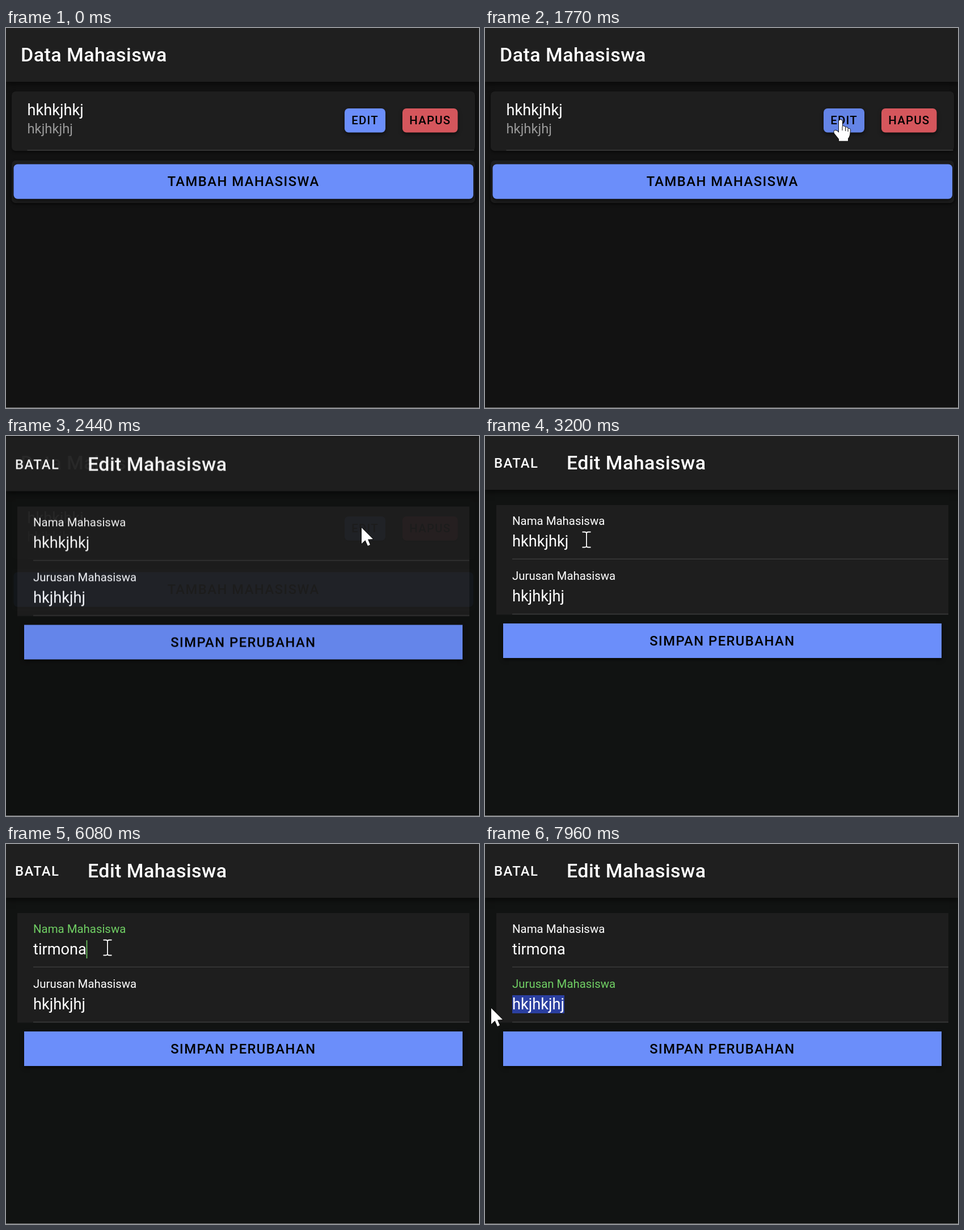
Animation, 834 px wide and 671 px high, one loop 8 s. Source, as an HTML page with a canvas:

```html
<!DOCTYPE html>
<html lang="id">
<head>
<meta charset="utf-8">
<title>Data Mahasiswa</title>
<style>
html, body { margin: 0; width: 100%; height: 100%; overflow: hidden; background: #121212; }
canvas { display: block; }
</style>
</head>
<body>
<canvas id="stage" width="834" height="671"></canvas>
<script>
const W = 834, H = 671, LOOP = 8000;
const BLUE = [107, 142, 250], GREEN = [112, 207, 100], WHITE = [255, 255, 255];
const HOVER = [100, 132, 230], RED = [213, 86, 92];
const NAME = 'tirmona', OLD_NAME = 'hkhkjhkj', MAJOR = 'hkjhkjhj';
const KEY_TIMES = [5350, 5415, 5480, 5620, 5715, 5810, 6080];
const CARET_ON = [[3450, 3950], [4010, 5010], [5350, 6580], [7080, 7350]];
const CLICKS = [[2030, 2200], [3450, 3680], [7350, 7955]];
const MODAL_START = 2303, MODAL_TIME = 280;

const NAME_COLORS = [[0, WHITE], [3450, GREEN], [4680, BLUE], [5350, GREEN], [7350, WHITE]];
const MAJOR_COLORS = [[0, WHITE], [7350, GREEN]];

// time, x, y of the pointer
const PATH = [
  [660, 450, 655], [1000, 505, 390], [1140, 535, 305], [1240, 570, 237],
  [1420, 580, 167], [1490, 602, 168], [1770, 627, 162], [2510, 627, 162],
  [2650, 430, 178], [2780, 235, 182], [2920, 205, 177], [3060, 181, 174],
  [3200, 179, 183], [6530, 179, 183], [6820, 187, 303], [6960, 176, 302],
  [7150, 150, 284], [7380, 150, 284], [7700, 62, 286], [7920, 11, 290], [LOOP, 11, 290]
];

const ARROW = new Path2D('M0 0V28L6.5 22L11 32L15 30L11 20.5L20 20Z');
const HAND = new Path2D('M-3 2Q0 -2 3 2V12Q7 10 8.5 14Q12 12 13 16Q17 15 17 19L16 27Q15 31 13 33V37.5H-3V34L-11 24Q-13 19 -9 19Q-6 19 -3 23Z');
const HAND_LINES = new Path2D('M3 12V19M8.5 14V20M13 16V21');
const IBEAM = new Path2D('M-7.5 -13.5H-3Q0 -13.5 0 -11Q0 -13.5 3 -13.5H7.5M0 -11V11M-7.5 13.5H-3Q0 13.5 0 11Q0 13.5 3 13.5H7.5');

const screen = document.getElementById('stage').getContext('2d');
const layer = document.createElement('canvas');
layer.width = W;
layer.height = H;
const modal = layer.getContext('2d');

const clamp = v => Math.min(1, Math.max(0, v));
const lerp = (a, b, k) => a + (b - a) * k;
const smooth = k => k * k * (3 - 2 * k);
const mix = (a, b, k) => a.map((v, i) => lerp(v, b[i], k));
const rgb = c => `rgb(${c.map(Math.round)})`;
const within = (spans, t) => spans.some(([a, b]) => t >= a && t < b);

function bezierEase(x, x1, y1, x2, y2) {
  const at = (s, a, b) => 3 * s * (1 - s) ** 2 * a + 3 * s * s * (1 - s) * b + s ** 3;
  let lo = 0, hi = 1;
  for (let i = 0; i < 24; i++) {
    const mid = (lo + hi) / 2;
    if (at(mid, x1, x2) < x) lo = mid; else hi = mid;
  }
  return at(lo, y1, y2);
}

function colorAt(keys, t) {
  let i = keys.length - 1;
  while (keys[i][0] > t) i--;
  if (i === 0) return rgb(keys[0][1]);
  return rgb(mix(keys[i - 1][1], keys[i][1], smooth(clamp((t - keys[i][0]) / 150))));
}

function pointerAt(t) {
  const i = PATH.findIndex(p => p[0] > t);
  if (i < 1) return null;
  const [a, b] = [PATH[i - 1], PATH[i]];
  const k = (t - a[0]) / (b[0] - a[0]);
  return { x: lerp(a[1], b[1], k), y: lerp(a[2], b[2], k) };
}

function pointerKind(t, p) {
  if (t < MODAL_START) {
    const onAdd = p.x > 14 && p.y > 241 && p.y < 302;
    return onAdd || p.x > 597 ? 'hand' : 'arrow';
  }
  if (t < 2820) return 'arrow';
  return p.x < 46 || p.y > 300 ? 'arrow' : 'ibeam';
}

function nameAt(t) {
  if (t < 4010) return OLD_NAME;
  if (t < 4470) return OLD_NAME.slice(0, 7);
  if (t < KEY_TIMES[0]) return OLD_NAME.slice(0, Math.max(0, 6 - Math.floor((t - 4470) / 38)));
  return NAME.slice(0, KEY_TIMES.filter(k => k <= t).length);
}

function write(c, text, x, y, size, color = '#fff', weight = 400, spacing = 0) {
  c.font = `${weight} ${size}px Roboto, sans-serif`;
  c.letterSpacing = spacing * size + 'px';
  c.fillStyle = color;
  c.fillText(text, x, y);
}

function box(c, x, y, w, h, color, radius = 0, blur = 0, drop = 0) {
  c.save();
  if (blur) {
    c.shadowColor = 'rgba(0,0,0,.55)';
    c.shadowBlur = blur;
    c.shadowOffsetY = drop;
  }
  c.fillStyle = color;
  c.beginPath();
  c.roundRect(x, y, w, h, radius);
  c.fill();
  c.restore();
}

function button(c, label, x, y, w, h, color, size, radius) {
  box(c, x, y, w, h, rgb(color), radius, 6, 3);
  c.textAlign = 'center';
  write(c, label, x + w / 2, y + h / 2 + size * 0.3415, size, '#000', 500, 0.06);
  c.textAlign = 'left';
}

function header(c, title, x) {
  box(c, 0, 0, W, 95, '#1f1f1f', 0, 10, 4);
  write(c, title, x, 59, 34, '#fff', 500, 0.0125);
}

function bottomEdge(c) {
  box(c, 0, 670, W, 1, '#777');
}

function drawList(c, t, p) {
  box(c, 0, 0, W, H, '#121212');
  header(c, 'Data Mahasiswa', 26);

  box(c, 10, 112, 817, 105, '#1e1e1e', 7, 5, 2);
  box(c, 37.5, 215, 788, 1.5, '#3b3b3b');
  write(c, OLD_NAME, 37.5, 154, 27.2);
  write(c, MAJOR, 37.5, 186, 23.8, '#999');

  const editHover = clamp((t - 1490) / 150);
  button(c, 'EDIT', 597, 142, 72, 42.5, mix(BLUE, HOVER, editHover), 20.4, 7);
  if (t > 2030) drawRipple(c, t - 2030);
  button(c, 'HAPUS', 699, 142, 97.5, 42.5, RED, 20.4, 7);

  box(c, 10, 234, 817, 75, '#1e1e1e', 7, 5, 2);
  const onAdd = p && p.y > 241 && p.y < 302;
  button(c, 'TAMBAH MAHASISWA', 13.5, 240.5, 810.5, 61.2, onAdd ? HOVER : BLUE, 23.8, 7);
  bottomEdge(c);
}

function drawRipple(c, age) {
  c.save();
  c.beginPath();
  c.roundRect(597, 142, 72, 42.5, 7);
  c.clip();
  c.fillStyle = `rgba(0,0,0,${0.16 * (1 - clamp((age - 225) / 150))})`;
  c.beginPath();
  c.arc(627, 162, 10 + 45 * clamp(age / 225), 0, 2 * Math.PI);
  c.fill();
  c.restore();
}

function drawSelection(c, t, p) {
  if (t < 7380) return;
  c.font = '400 27.2px Roboto, sans-serif';
  c.letterSpacing = '0px';
  const edges = [...MAJOR, ''].map((_, i) => 48 + c.measureText(MAJOR.slice(0, i)).width);
  const nearest = edges.reduce((a, b) => Math.abs(b - p.x) < Math.abs(a - p.x) ? b : a);
  box(c, nearest, 267, edges[MAJOR.length] - nearest, 32, '#2b3f9f');
}

function drawEdit(c, t, p) {
  box(c, 0, 0, W, H, '#111312');
  header(c, 'Edit Mahasiswa', 144);
  write(c, 'BATAL', 16, 55.5, 23.8, '#fff', 500, 0.06);

  box(c, 20, 122, 797, 193.5, '#1e1e1e');
  box(c, 48, 216.5, 769, 1.5, '#3b3b3b');
  box(c, 48, 313.8, 769, 1.5, '#3b3b3b');

  const value = nameAt(t), accent = colorAt(NAME_COLORS, t);
  write(c, 'Nama Mahasiswa', 48, 157.3, 20.4, accent);
  write(c, value || 'Masukkan Nama Mahasiswa', 48, 195.3, 27.2, value ? '#fff' : '#999');
  if (within(CARET_ON, t)) box(c, 48 + c.measureText(value).width - 0.2, 170, 1.6, 32, accent);

  write(c, 'Jurusan Mahasiswa', 48, 254.3, 20.4, colorAt(MAJOR_COLORS, t));
  drawSelection(c, t, p);
  write(c, MAJOR, 48, 292.3, 27.2);

  button(c, 'SIMPAN PERUBAHAN', 32, 331, 773, 61, BLUE, 23.8, 0);
  bottomEdge(c);
}

function drawPointer(c, t, p) {
  const kind = pointerKind(t, p);
  c.save();
  c.translate(p.x, p.y);
  c.lineJoin = 'round';
  c.fillStyle = '#fff';
  c.strokeStyle = '#111';
  if (kind === 'ibeam') {
    c.lineWidth = 4;
    c.stroke(IBEAM);
    c.strokeStyle = '#fff';
    c.lineWidth = 1.8;
    c.stroke(IBEAM);
  } else {
    const shape = kind === 'hand' ? HAND : ARROW;
    c.lineWidth = 1.8;
    c.stroke(shape);
    c.fill(shape);
    c.lineWidth = 1;
    if (kind === 'hand') c.stroke(HAND_LINES);
  }
  c.restore();

  if (within(CLICKS, t)) {
    c.fillStyle = 'rgba(255,255,0,.47)';
    c.beginPath();
    c.arc(p.x - 2, p.y - 1.5, 20.4, 0, 2 * Math.PI);
    c.fill();
  }
}

function draw(t) {
  const p = pointerAt(t);
  const k = bezierEase(clamp((t - MODAL_START) / MODAL_TIME), 0.36, 0.66, 0.04, 1);
  const shown = t >= MODAL_START + MODAL_TIME ? 1 : k;
  if (shown < 1) drawList(screen, t, p);
  if (t >= MODAL_START) {
    drawEdit(modal, t, p);
    box(screen, 0, 0, W, H, `rgba(0,0,0,${0.32 * shown})`);
    screen.globalAlpha = shown;
    screen.drawImage(layer, 0, 40 * (1 - shown));
    if (shown < 1) box(screen, 0, 670, W, 1, '#777');
    screen.globalAlpha = 1;
  }
  if (p) drawPointer(screen, t, p);
}

const start = performance.now();
function tick() {
  draw((performance.now() - start) % LOOP);
  requestAnimationFrame(tick);
}
tick();
</script>
</body>
</html>
```
